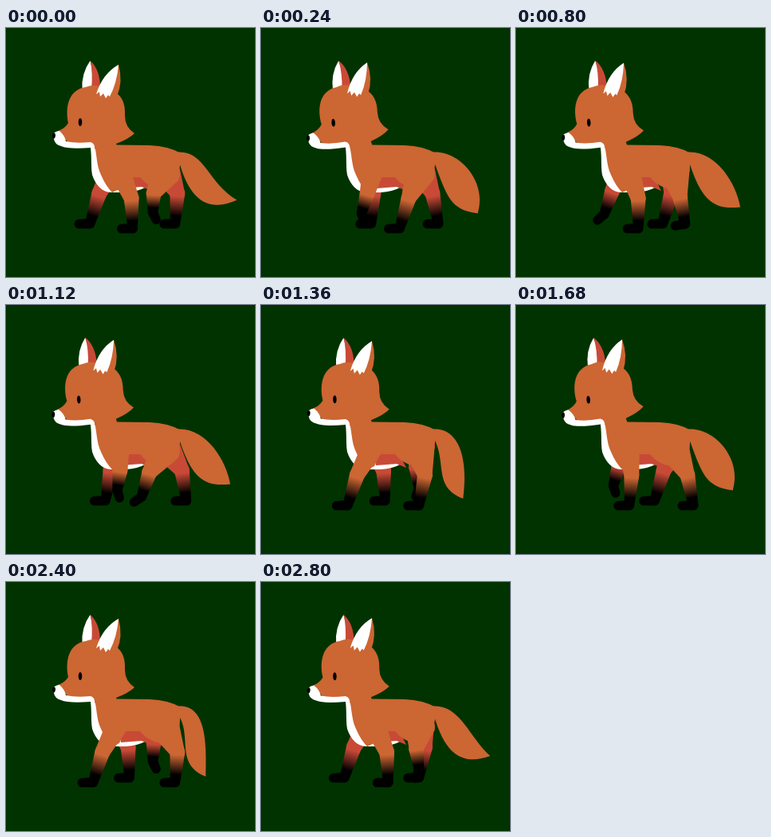
An HTML page with a canvas for the animation above (2880 ms loop, 312 by 312 pixels).

```html
<!DOCTYPE html>
<html lang="en">
<head>
<meta charset="utf-8">
<title>Walking fox</title>
<style>
  html, body { margin: 0; width: 100%; height: 100%; overflow: hidden; background: #030; }
  canvas { display: block; }
</style>
</head>
<body>
<canvas id="stage" width="312" height="312"></canvas>
<script>
const ctx = document.getElementById('stage').getContext('2d');
const ORANGE = '#c63', RED = '#c84a36', WHITE = '#fff', BLACK = '#000';
const STEP = 80, STEPS = 12;

// Knee and ankle sway around x by reach, peaking at step peak; the paw lifts from liftAt for liftFor steps
const frontLeg = {
  hip: [141, 176, 14],
  knee: { x: 139, reach: 19, peak: -.6 },
  ankle: { x: 134, reach: 26, peak: -.6 },
  liftAt: 0, liftFor: 5, farShift: -4
};
const hindLeg = {
  hip: [199, 182, 19],
  knee: { x: 200, reach: 21, peak: 7.5 },
  ankle: { x: 198, reach: 28, peak: 8 },
  liftAt: 9.5, liftFor: 5.5, farShift: 0
};

const shape = (color, d) => [color, new Path2D(d)];
const torso = [
  shape(WHITE, 'M105 144C108 158 106 172 108 184C112 196 120 206 132 206L150 206Q165 205 174 200L170 170L125 144Z'),
  shape(RED, 'M142 184H172L182 204L170 199L144 201Z'),
  shape(ORANGE, 'M110 144C114 156 113 172 119 184Q125 198 133 206L142 202L149 187L168 187Q180 202 200 202Q216 185 218 172L219 157Q204 148 180 147L140 146.5Z')
];
const head = [
  shape(WHITE, 'M105.5 41Q94 57 95.5 78L109 77Q110 55 105.5 41Z'),
  shape(RED, 'M105.5 41Q118 52 118 75L107 77Q109 56 105.5 41Z'),
  shape(ORANGE, 'M141 46Q147 67 139 86L112 83Q122 59 141 46Z'),
  shape(ORANGE, 'M65 129Q74 126 78 119C74 100 78 77 100 74Q112 69 124 76C146 79 150 96 149 110Q149 124 161 132Q154 139 138 145L140 152L112 152L106 145L80 146Z'),
  shape(WHITE, 'M141 46Q121 57 113 83L117 80L118 86L122 82L125 88L128 84L130 86Q139 69 141 46Z'),
  shape(WHITE, 'M59 133Q62 129 67 129Q74 135 75 142Q88 145 106 143Q112 145 111 152L106 150Q78 152 69 148Q61 146 60 139Z'),
  shape(BLACK, 'M59 132Q62 130 62 135Q61 140 59 138Q57 135 59 132Z'),
  shape(BLACK, 'M93 113C96 113 96 123 93 123C90 123 90 113 93 113Z')
];

const wave = (phase, peak = 0) => Math.cos((phase - peak) / STEPS * 2 * Math.PI);
const sway = ({ x, reach, peak }, phase) => x + reach * wave(phase, peak);
const radians = degrees => degrees * Math.PI / 180;

function paint(shapes) {
  for (const [color, path] of shapes) {
    ctx.fillStyle = color;
    ctx.fill(path);
  }
}

function limb([ax, ay, ar], [bx, by, br]) {
  const a = Math.atan2(by - ay, bx - ax), q = Math.PI / 2;
  ctx.beginPath();
  ctx.arc(ax, ay, ar, a + q, a + 3 * q);
  ctx.arc(bx, by, br, a - q, a + q);
  ctx.fill();
}

function drawLeg(leg, phase, far) {
  if (far) phase += STEPS / 2;
  const swing = (phase - leg.liftAt + STEPS) % STEPS / leg.liftFor;
  const lift = swing < 1 ? Math.sin(swing * Math.PI) : 0;
  const kx = sway(leg.knee, phase), ky = 213 - 6 * lift;
  const ax = sway(leg.ankle, phase), ay = 251 - 20 * lift;
  const tilt = radians(178 - 115 * lift ** 2);
  const length = 14 - 4 * lift;

  const fade = ctx.createLinearGradient(kx, ky, ax, ay);
  fade.addColorStop(.1, far ? RED : ORANGE);
  fade.addColorStop(.75, BLACK);
  ctx.save();
  if (far) ctx.translate(leg.farShift, -6);
  ctx.fillStyle = fade;
  const knee = [kx, ky, 9.5], ankle = [ax, ay, 6.2];
  limb(leg.hip, knee);
  limb(knee, ankle);
  limb(ankle, [ax + length * Math.cos(tilt), ay + length * Math.sin(tilt), 5.7]);
  ctx.restore();
}

function drawTail(phase) {
  const up = wave(phase), bulge = wave(2 * phase);
  const angle = radians(54 - 15 * up);
  const tipX = 217 + 93 * Math.cos(angle), tipY = 157 + 93 * Math.sin(angle);
  ctx.fillStyle = ORANGE;
  ctx.beginPath();
  ctx.moveTo(212, 156);
  ctx.bezierCurveTo(249, 151, 268 - 16 * bulge, 194, tipX, tipY);
  ctx.bezierCurveTo(237 + 25 * up, 228, 233, 211 + 15 * up, 217, 168);
  ctx.fill();
}

function drawHead(phase) {
  const nod = (1 - wave(2 * phase)) / 2;
  ctx.save();
  ctx.translate(100, 148);
  ctx.rotate(-.077 * nod);
  ctx.translate(-100, -148);
  paint(head);
  ctx.restore();
}

function draw() {
  const phase = Math.floor(performance.now() / STEP) % STEPS;
  ctx.fillStyle = '#030';
  ctx.fillRect(0, 0, 312, 312);
  drawTail(phase);
  drawLeg(hindLeg, phase, true);
  drawLeg(frontLeg, phase, true);
  paint(torso);
  drawLeg(hindLeg, phase, false);
  drawLeg(frontLeg, phase, false);
  drawHead(phase);
  requestAnimationFrame(draw);
}
draw();
</script>
</body>
</html>
```
